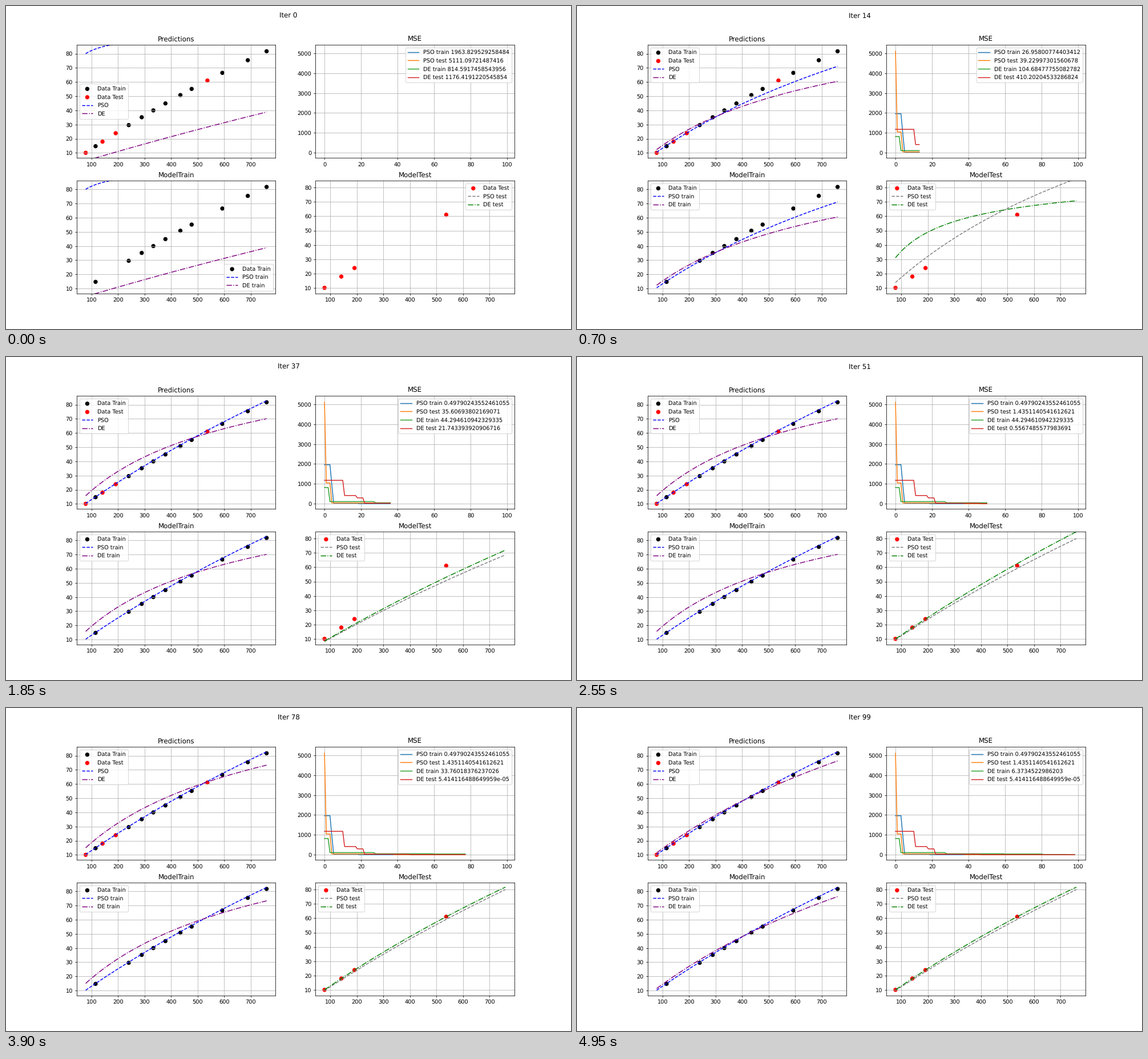
These frames come from a looping animation (990 by 566 pixels, 5000 ms). A matplotlib script:

```python
import numpy as np
import matplotlib.pyplot as plt
from matplotlib.animation import FuncAnimation

plt.rcParams["font.family"] = "DejaVu Sans"
plt.rcParams["text.hinting"] = "none"

W, H, DPI = 990, 566, 990 / 14
ITERS, INTERVAL = 100, 50


def shape(x, c):
    return 1 - (1 + c * x) ** -0.5


# Misra data: loads, and the response of the certified model
X = np.array([77.6, 114.9, 141.1, 190.8, 239.9, 289.0, 332.8, 378.4,
              434.8, 477.3, 536.8, 593.1, 689.1, 760.0])
Y = 636.4 * shape(X, 4.162e-4)
TEST = np.isin(np.arange(len(X)), [0, 2, 3, 10])
GRID_X = np.linspace(X[0], X[-1], 120)

# Improvements of each run: (iteration, curve start, curve end)
RUNS = {
    "PSO train": [(0, 80, 93), (4, 57, 82.5), (5, 10.5, 71.1),
                  (19, 10.2, 82.7)],
    "PSO test": [(0, 96, 98.6), (1, 44.5, 79), (4, 13.75, 86.3),
                 (18, 8.1, 68.6), (38, 9.5, 80)],
    "DE train": [(0, 4.35, 38.8), (3, 12.3, 60.5), (19, 19.6, 76.5),
                 (28, 15.7, 70.1), (60, 15, 73.3), (81, 11.7, 74.4),
                 (94, 11.4, 76.3)],
    "DE test": [(0, 0.01, 0.09), (11, 31, 70.8), (18, 27.5, 69),
                (22, 8.45, 71.9), (47, 9.95, 84.8), (60, 10.15, 80.8),
                (71, 10.04, 81.7)],
}


def fit(lo, hi):
    """Model through both end values, its curvature found by bisection."""
    a, b = -7.0, 3.0
    for _ in range(60):
        mid = (a + b) / 2
        ratio = shape(X[-1], 10 ** mid) / shape(X[0], 10 ** mid)
        a, b = (mid, b) if ratio > hi / lo else (a, mid)
    scale = lo / shape(X[0], 10 ** a)
    return lambda x: scale * shape(x, 10 ** a)


def expand(name, steps):
    """Errors and curves per iteration, held until the next improvement."""
    mask = TEST if name.endswith("test") else ~TEST
    models = [fit(lo, hi) for _, lo, hi in steps]
    errors = [np.mean((m(X[mask]) - Y[mask]) ** 2) for m in models]
    starts = [step[0] for step in steps]
    held = np.searchsorted(starts, np.arange(ITERS), side="right") - 1
    return [errors[k] for k in held], [models[k](GRID_X) for k in held]


HISTORY = {name: expand(name, steps) for name, steps in RUNS.items()}

fig = plt.figure(figsize=((W + 0.01) / DPI, (H + 0.01) / DPI), dpi=DPI)
(ax_pred, ax_mse), (ax_train, ax_test) = fig.subplots(2, 2)
fig.subplots_adjust(right=0.8999)
title = fig.suptitle("Iter 0")
curves = []


def scatter(ax, mask, color, label):
    # a list of widths keeps the dots off the whole-pixel raster
    ax.scatter(X[mask], Y[mask], color=color, label=label,
               linewidths=[1.5, 1.5])


def curve(ax, run, style, color, label):
    line, = ax.plot([], [], style, color=color, label=label)
    curves.append((line, run))


def finish(ax, name, xlim, ylim, loc="best"):
    ax.set(title=name, xlim=xlim, ylim=ylim)
    ax.grid()
    return ax.legend(loc=loc)


scatter(ax_pred, ~TEST, "black", "Data Train")
scatter(ax_pred, TEST, "red", "Data Test")
curve(ax_pred, "PSO train", "--", "blue", "PSO")
curve(ax_pred, "DE train", "-.", "purple", "DE")

scatter(ax_train, ~TEST, "black", "Data Train")
curve(ax_train, "PSO train", "--", "blue", "PSO train")
curve(ax_train, "DE train", "-.", "purple", "DE train")

scatter(ax_test, TEST, "red", "Data Test")
curve(ax_test, "PSO test", "--", "gray", "PSO test")
curve(ax_test, "DE test", "-.", "green", "DE test")

mse_lines = [ax_mse.plot([], [], label=name)[0] for name in RUNS]

pad = 0.05 * (X[-1] - X[0])
x_range = (X[0] - pad, X[-1] + pad)
finish(ax_pred, "Predictions", x_range, (6.5, 86.3))
finish(ax_train, "ModelTrain", x_range, (6.5, 86.3))
finish(ax_test, "ModelTest", x_range, (6.1, 85.0))
mse_legend = finish(ax_mse, "MSE", (-4.95, 103.95), (-259, 5439),
                    "upper right")


def update(i):
    title.set_text(f"Iter {i}")
    for line, run in curves:
        line.set_data(GRID_X, HISTORY[run][1][i])
    for line, text, name in zip(mse_lines, mse_legend.get_texts(), RUNS):
        mse = HISTORY[name][0]
        line.set_data(range(i), mse[:i])
        text.set_text(f"{name} {mse[i]}")
    return []


anim = FuncAnimation(fig, update, frames=ITERS, interval=INTERVAL,
                     repeat=True, repeat_delay=0)
plt.show()
```
